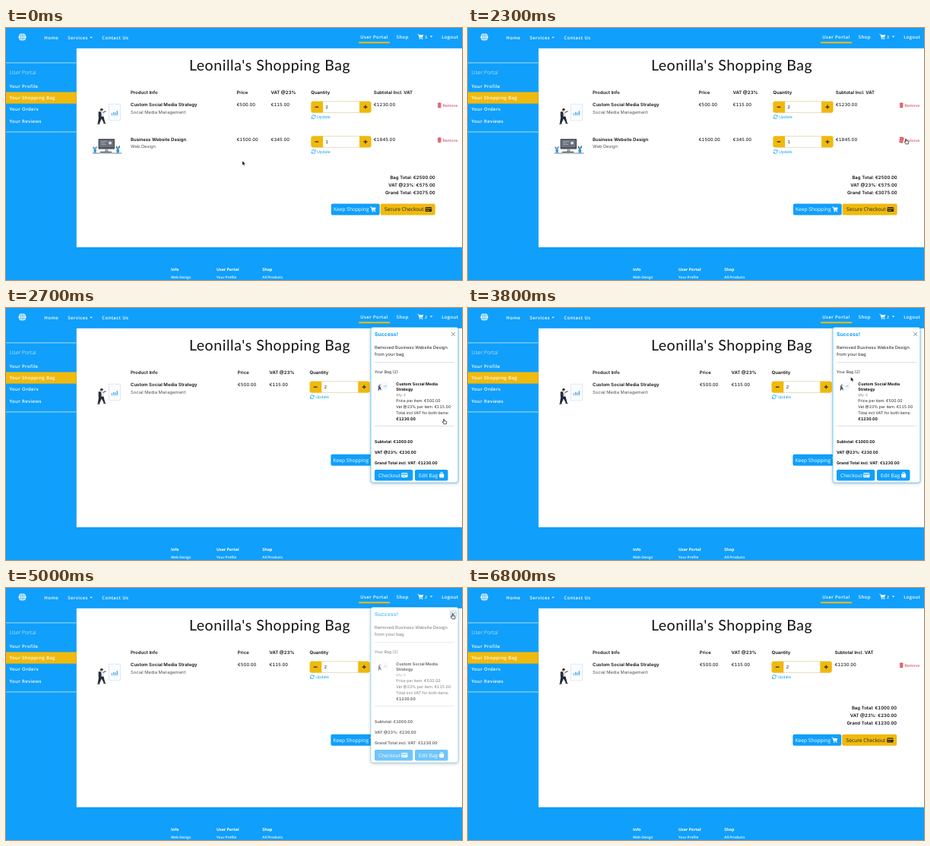
Recreate the animation shown at these times as an HTML page. Size 600 by 332 pixels, loop 6900 ms.

```html
<!DOCTYPE html>
<html lang="en">
<head>
<meta charset="utf-8">
<title>Shopping bag</title>
<style>
html, body { margin: 0; width: 100%; height: 100%; overflow: hidden; background: #109ffa; }
svg { display: block; width: 100vw; height: 100vh; }
text { font: 400 5.8px Inter, "Liberation Sans", sans-serif; font-variant-numeric: tabular-nums; fill: #212529; text-rendering: geometricPrecision; white-space: pre; }
.b { font-weight: 600; font-size: 6px; fill: #111; }
.p { font-weight: 500; font-size: 5.9px; }
.g { fill: #555; }
.nav { font: 600 6px "Open Sans", "Noto Sans", sans-serif; letter-spacing: .36px; fill: #fff; }
.count { font-size: 5.3px; }
.side { font: 300 7px "Open Sans", "Noto Sans", sans-serif; fill: #fff; }
.foot { font: 600 4.7px "Open Sans", "Noto Sans", sans-serif; fill: #fff; }
.fh { font: 700 5.3px "Open Sans", "Noto Sans", sans-serif; fill: #fff; }
.btn { font: 400 6.65px "Open Sans", "Noto Sans", sans-serif; }
.w { fill: #fff; }
.end { text-anchor: end; }
.title { font: 400 19.5px Lato, sans-serif; letter-spacing: .56px; text-anchor: middle; fill: #111; }
.link { font-size: 5.2px; fill: #12a5e8; }
.del { font-size: 5.2px; fill: #dc3545; }
.ok { font-weight: 700; font-size: 6.9px; fill: #109ffa; }
.s { font-size: 5.2px; }
.sb { font-size: 5.3px; font-weight: 700; fill: #111; }
.q { font-size: 4.4px; fill: #666; }
#sheet { filter: drop-shadow(0 1.5px 2px rgba(0, 0, 0, .25)); }
</style>
</head>
<body>
<svg id="stage" viewBox="0 0 600 332" preserveAspectRatio="none">
<defs>
  <g id="cart">
    <path d="M0 .4h1.4l1.3 4.6h4" fill="none" stroke="currentColor" stroke-width=".9"/>
    <path d="M1.7 1.1h5.8l-.8 3H2.5z" fill="currentColor"/>
    <circle cx="3.1" cy="6.3" r=".8" fill="currentColor"/><circle cx="6.2" cy="6.3" r=".8" fill="currentColor"/>
  </g>
  <g id="card" fill="currentColor">
    <path d="M.6 0h6.8q.6 0 .6.6v.8H0V.6Q0 0 .6 0zM0 2.6h8v2.8q0 .6-.6.6H.6Q0 6 0 5.4zM1 4.1v.8h1.4v-.8zm2 0v.8h2v-.8z" fill-rule="evenodd"/>
    <path d="M0 1v4M8 1v4" stroke="currentColor" stroke-width=".5"/>
  </g>
  <path id="bag" d="M0 2h1.2V1.5a1.8 1.8 0 0 1 3.6 0V2H6v4q0 1-1 1H1Q0 7 0 6zM2 2h2v-.5a1 1 0 0 0-2 0z" fill="currentColor" fill-rule="evenodd"/>
  <g id="trash">
    <path d="M-2.5-2.6h5M-.9-3.1H.9" stroke="#dc3545" stroke-width=".9"/>
    <path d="M-2.1-1.8h4.2L1.9 3h-3.8z" fill="#dc3545"/>
    <path d="M-.9-1v3.3M0-1v3.3M.9-1v3.3" stroke="#fff" stroke-width=".3"/>
  </g>
  <g id="refresh">
    <path d="M-2.4-.5A2.45 2.45 0 0 1 1.9-1.6M2.4.5A2.45 2.45 0 0 1-1.9 1.6" fill="none" stroke="#12a5e8" stroke-width=".8"/>
    <path d="M2.9-2.9v2.4H.5zM-2.9 2.9V.5h2.4z" fill="#12a5e8"/>
  </g>
  <g id="reader">
    <rect x="135.2" y="100.3" width="15.4" height="21.6" rx=".6" fill="#fafcff" stroke="#cdd9e6" stroke-width=".6"/>
    <path d="M139.4 114.6v-2.2m2.3 2.2v-3.8m2.3 3.8v-3m2.3 3v-5.4" stroke="#2f9be6" stroke-width="1.2"/>
    <path d="M138 115.2h9.6" stroke="#8ab8dc" stroke-width=".4"/>
    <path d="M124.5 110.8l3.6-.6 1 6-4.4.8z" fill="#e3e8ee"/>
    <path d="M121.6 110.4q2.6-1.2 3.6.6l.5 5.6-4 1z" fill="#29303c"/>
    <path d="M127.5 111.4l4-1.8" stroke="#293241" stroke-width="1"/>
    <path d="M122.2 116.8l6.2-.4 2.2 8.8h-1.7l-3.2-5.6-2.6 6.2h-2.4z" fill="#202938"/>
    <path d="M120.2 126.3h3.4m4.6-.8h3.2" stroke="#111" stroke-width=".8"/>
    <circle cx="126" cy="108.4" r="1.5" fill="#d69a83"/>
    <path d="M123.9 109q-.2-3 2.2-2.9 2 .1 1.7 1.9l-2 .2z" fill="#222"/>
  </g>
  <g id="desk">
    <rect x="121.5" y="146" width="21.5" height="13.5" rx=".7" fill="#4a4e57"/>
    <rect x="122.8" y="147.2" width="18.9" height="10" fill="#6c727d"/>
    <path d="M125 149.5h8m-8 2h5m-5 2h7" stroke="#aab4c2" stroke-width=".7"/>
    <circle cx="137" cy="151.5" r="2" fill="#d7e0ea"/>
    <path d="M130.5 159.5h3.5l.8 3.3h-5z" fill="#9aa1ab"/>
    <path d="M124 163.4h15" stroke="#333" stroke-width="1"/>
    <path d="M113.5 165h39" stroke="#56606c" stroke-width=".8"/>
    <path d="M115.3 160h3.6l-.5 4.6h-2.6zM145.2 160h4l-.5 4.6h-3z" fill="#2795e0"/>
    <path d="M117 160q-3-1-2.5-4 2.5 1 2.5 4 0-3 2.3-4.5.7 3.3-2.3 4.5M147.2 160q-3-1-2.5-5 2.7 1.5 2.5 5 0-4 2.5-5.5.8 4-2.5 5.5" fill="#3a6f8f"/>
  </g>
</defs>

<rect width="600" height="332" fill="#109ffa"/>
<rect x="92.8" y="26.8" width="507.2" height="262" fill="#fff"/>
<g id="frame"></g>
<g id="full"></g>
<g id="less"></g>
<g id="popup">
  <rect id="sheet" x="480" y="25.3" width="115" height="205" rx="3" fill="#fff"/>
  <g id="note"></g>
  <g id="close">
    <rect id="ring" x="584.6" y="30" width="8" height="9" rx="1.2" fill="#eef6fc" stroke="#9ccbee" stroke-width=".7"/>
    <path d="M586.3 32.2l4.6 4.6m0-4.6l-4.6 4.6" stroke="#666" stroke-width=".8"/>
  </g>
</g>
<g id="pointer">
  <path id="arrow" d="M0 0v5.3l1.3-1.1.9 2 1-.5-.9-1.9h1.7z" fill="#000" stroke="#fff" stroke-width=".35"/>
  <path id="hand" d="M-.6 0q.6-.5 1 .2v2l2.3.5q.9.3.8 1.3l-.5 2.4H-.3L-2 4q-.2-.9.6-.8l.8.6z" fill="#fff" stroke="#111" stroke-width=".7"/>
</g>
</svg>
<script>
const $ = id => document.getElementById(id);
const text = (x, y, s, cls = "") => `<text x="${x}" y="${y}" class="${cls}">${s}</text>`;
const rect = (x, y, w, h, fill, r = 0) => `<rect x="${x}" y="${y}" width="${w}" height="${h}" fill="${fill}" rx="${r}"/>`;
const icon = (id, x, y, color = "#fff", more = "") => `<use href="#${id}" transform="translate(${x} ${y}) ${more}" color="${color}"/>`;
const BLUE = "#109ffa", GOLD = "#f0b90e", PALE = "#70c6fc";

function frame() {
  const side = ["Your Profile", "Your Shopping Bag", "Your Orders", "Your Reviews"];
  const foot = [[217, "Info", "Web Design"], [277, "User Portal", "Your Profile"], [337.3, "Shop", "All Products"]];
  return `<g fill="none" stroke="${BLUE}" stroke-width=".6"><circle cx="21.5" cy="12" r="5" fill="#fff" stroke="none"/>
    <ellipse cx="21.5" cy="12" rx="2.2" ry="5"/><path d="M16.5 10.2h10m-10 3.6h10M21.5 7v10"/></g>` +
    text(50.3, 14.8, "Home", "nav") + text(81.3, 14.8, "Services", "nav") + text(126.3, 14.8, "Contact Us", "nav") +
    text(466.3, 13.8, "User Portal", "nav") + text(513.8, 13.8, "Shop", "nav") + text(573.2, 13.8, "Logout", "nav") +
    `<path d="M110.2 11.7h3.6l-1.8 1.8zM557.8 10.4h3.6l-1.8 1.8z" fill="#fff"/>` +
    icon("cart", 541.5, 8) + rect(464, 18.2, 41, 2, GOLD) +
    rect(0, 45, 92.5, 1.6, PALE) + rect(0, 136, 92.5, 1.6, PALE) + rect(0, 84.4, 92.8, 15.2, GOLD) +
    text(4.4, 60.6, "User Portal", "side") +
    side.map((s, i) => text(4.4, 79.2 + i * 15.1, s, "nav")).join("") +
    text(347, 56, "Leonilla's Shopping Bag", "title") +
    foot.map(([x, head, item]) => text(x, 319.6, head, "fh") + text(x, 329.5, item, "foot")).join("");
}

function stepper(x, y, n) {
  return rect(x, y, 79.3, 15.2, GOLD, 3.2) + rect(x + 15.8, y + .2, 48, 14.8, "#fff") +
    `<path d="M${x + 15.8} ${y + .3}h48m-48 14.6h48" stroke="#d5dadf" stroke-width=".5"/>
    <path d="M${x + 5.3} ${y + 7.6}h4.6m59.3 0h5m-2.5-2.5v5" stroke="#222" stroke-width="1.1"/>` +
    text(x + 19, y + 9.8, n) + icon("refresh", x + 3.3, y + 20.6) + text(x + 7.7, y + 22.6, "Update", "link");
}

function row(dy, cols, name, kind, values, n) {
  const [price, vat, qty, sub] = cols;
  return text(164, 103.3 + dy, name, "b") + text(164, 112.5 + dy, kind, "g") +
    text(price, 103.3 + dy, values[0], "p") + text(vat, 103.3 + dy, values[1], "p") +
    text(sub, 103.3 + dy, values[2], "p") + stepper(qty, 96.5 + dy, n) +
    `<g transform="translate(570.3 ${102 + dy})"><use href="#trash" ${dy ? 'id="bin"' : ""}/></g>` +
    text(574.5, 104 + dy, "Remove", "del");
}

function page(count, cols, top, right, totals) {
  const heads = ["Price", "VAT @23%", "Quantity", "Subtotal Incl. VAT"];
  const labels = ["Bag Total", "VAT @23%", "Grand Total"];
  return text(551, 13.5, count, "nav count") + text(164, 87, "Product Info", "b") +
    heads.map((s, i) => text(cols[i], 87, s, "b")).join("") + icon("reader", 0, 0) +
    row(0, cols, "Custom Social Media Strategy", "Social Media Management", ["€500.00", "€115.00", "€1230.00"], 2) +
    labels.map((s, i) => text(right, top + i * 10.2, `${s}: €${totals[i]}.00`, "b end")).join("") +
    rect(right - 136.8, top + 32.8, 63.8, 15, BLUE, 2) + rect(right - 72, top + 32.8, 72, 15, GOLD, 2) +
    text(right - 133.7, top + 42.8, "Keep Shopping", "btn w") + icon("cart", right - 85.5, top + 36.8) +
    text(right - 66.6, top + 42.8, "Secure Checkout", "btn") + icon("card", right - 12.8, top + 37.4, "#222");
}

function note() {
  const line = y => `<path d="M485 ${y}h105" stroke="#c8c8c8" stroke-width=".6"/>`;
  const lines = [
    [485, 37, "Success!", "ok"], [485, 54, "Removed Business Website Design"], [485, 63.4, "from your bag"],
    [485, 86, "Your Bag (2)", "s"], [513.3, 101.5, "Custom Social Media", "sb"], [513.3, 109, "Strategy", "sb"],
    [513.3, 116, "Qty: 2", "q"], [513.3, 123.6, "Price per item: €500.00", "s"],
    [513.3, 131.6, "Vat @23% per item: €115.00", "s"], [513.3, 139.6, "Total incl VAT for both items:", "s"],
    [513.3, 147.6, "€1230.00", "sb"], [485, 178, "Subtotal: €1000.00", "sb"],
    [485, 192, "VAT @23%: €230.00", "sb"], [485, 206, "Grand Total incl. VAT: €1230.00", "sb"]
  ];
  return `<rect x="480" y="25.3" width="115" height="205" rx="3" fill="none" stroke="#4cc3ee" stroke-width=".8"/>` +
    line(71.7) + line(155.5) + lines.map(l => text(...l)).join("") +
    icon("reader", 441.5, 58, "#000", "scale(.4)") +
    rect(485, 213, 50.3, 14.5, BLUE, 2) + rect(538, 213, 43.5, 14.5, BLUE, 2) +
    text(490, 223, "Checkout", "btn w") + icon("card", 520.3, 217.2) +
    text(543, 223, "Edit Bag", "btn w") + icon("bag", 570.2, 216.4);
}

$("frame").innerHTML = frame();
const wide = [303.4, 348.5, 401.3, 483.8], slim = [304.8, 346.5, 399.5, 482.4];
$("full").innerHTML = page(3, wide, 198.6, 564.7, [2500, 575, 3075]) + icon("desk", 0, 0) +
  row(45.8, wide, "Business Website Design", "Web Design", ["€1500.00", "€345.00", "€1845.00"], 1);
$("less").innerHTML = page(2, slim, 160, 564.2, [1000, 230, 1230]);
$("note").innerHTML = note();

const LOOP = 6900, RELOAD = 2500, HOVER = 1100, CLOSE = 4900, GONE = 5150;
const path = [[0, 311, 175.3], [200, 311, 175.3], [1200, 576.3, 146.4], [2800, 576.3, 146.4],
  [3600, 503.7, 91], [4000, 503.7, 91], [4700, 587.5, 34.4], [LOOP, 587.5, 34.4]];
const clamp = v => Math.max(0, Math.min(1, v));
const show = (id, on) => $(id).style.display = on ? "" : "none";

function pointerAt(t) {
  const i = path.findIndex((p, k) => k && t < p[0]);
  const [t0, x0, y0] = path[i - 1], [t1, x1, y1] = path[i];
  const u = (t - t0) / (t1 - t0), e = u * u * (3 - 2 * u);
  return [x0 + (x1 - x0) * e, y0 + (y1 - y0) * e];
}

function draw(t) {
  const removed = t >= RELOAD;
  show("full", !removed);
  show("less", removed);
  const hover = clamp((t - HOVER) / 200);
  $("bin").setAttribute("transform", `rotate(${12 * hover}) scale(${1 + .2 * hover})`);

  show("popup", removed && t < GONE);
  $("popup").setAttribute("opacity", clamp((t - RELOAD) / 150));
  $("note").setAttribute("opacity", clamp((GONE - t) / (GONE - CLOSE)));
  show("ring", t >= CLOSE);

  const hand = t >= HOVER && t < 2900 || t >= 4600;
  show("hand", hand);
  show("arrow", !hand);
  show("pointer", t < 5500);
  $("pointer").setAttribute("transform", `translate(${pointerAt(t)})`);
}

function tick() {
  draw(Math.floor(performance.now() % LOOP / 100) * 100);
  requestAnimationFrame(tick);
}
tick();
</script>
</body>
</html>
```
